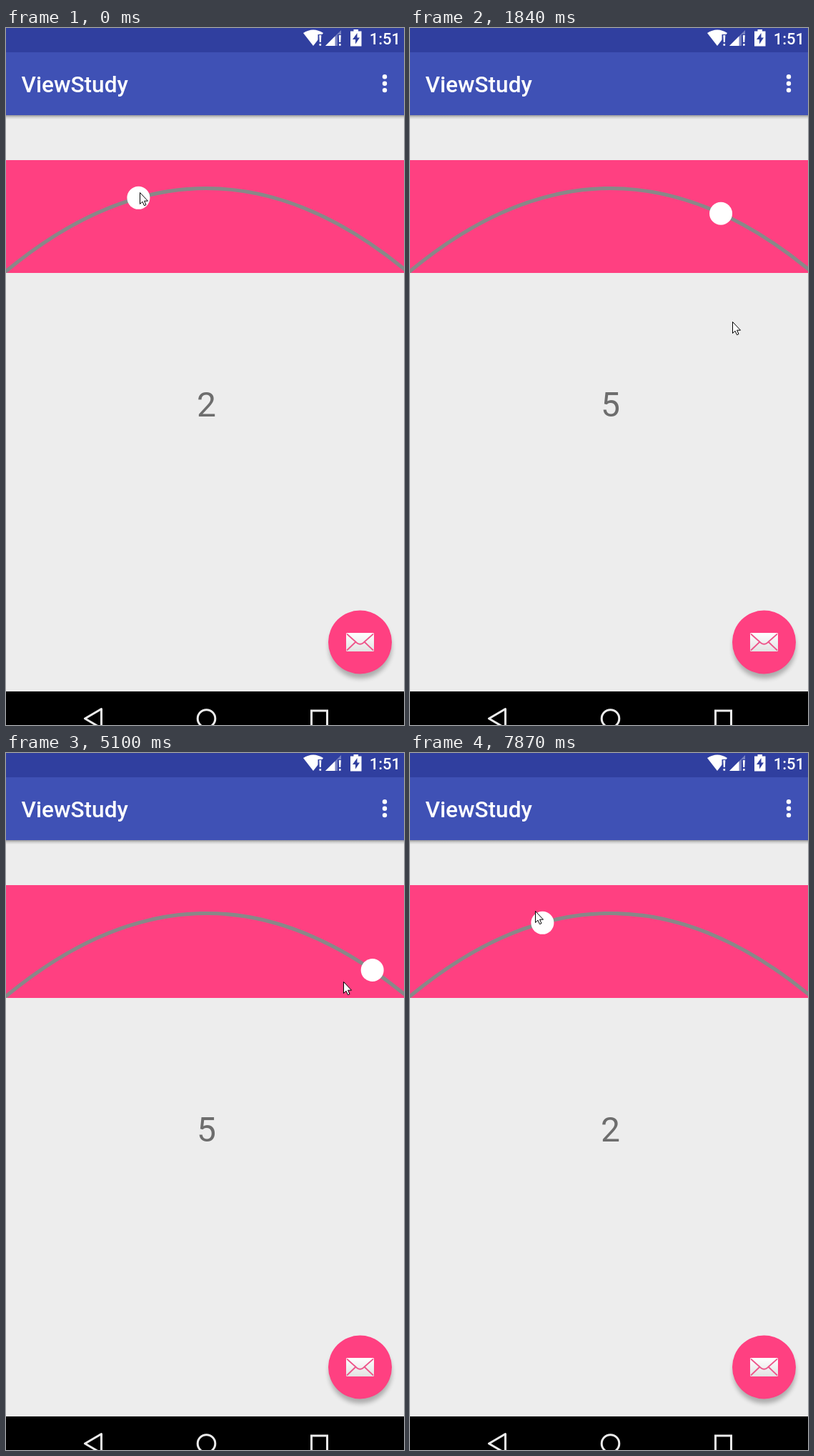
Animation of 557 by 976 pixels, one loop 8000 ms. Source, as an HTML page:

```html
<!DOCTYPE html>
<html lang="en">
<head>
<meta charset="utf-8">
<title>Arc slider</title>
<style>
html, body { margin: 0; width: 100%; height: 100%; overflow: hidden; background: #ededed; }
svg { display: block; width: 557px; height: 976px; font-family: Roboto, sans-serif; }
</style>
</head>
<body>
<svg viewBox="0 0 557 976">
  <defs>
    <linearGradient id="barShade" x2="0" y2="1">
      <stop stop-color="#000" stop-opacity=".36"/>
      <stop offset=".5" stop-color="#000" stop-opacity=".12"/>
      <stop offset="1" stop-color="#000" stop-opacity="0"/>
    </linearGradient>
    <linearGradient id="paper" x2="0" y2="1">
      <stop stop-color="#fff"/>
      <stop offset="1" stop-color="#e2e2e2"/>
    </linearGradient>
    <filter id="blur" x="-20%" y="-20%" width="140%" height="140%"><feGaussianBlur stdDeviation="3.2"/></filter>
    <clipPath id="panel"><rect y="185" width="557" height="158"/></clipPath>
  </defs>

  <rect width="557" height="976" fill="#ededed"/>
  <rect y="122" width="557" height="6" fill="url(#barShade)"/>
  <rect width="557" height="122" fill="#3f51b5"/>
  <rect width="557" height="34" fill="#303f9f"/>

  <!-- status icons -->
  <g fill="#fff">
    <path d="M416 7Q430-2 444 7L430 25Z"/>
    <path d="M447 25L469 3V25Z" opacity=".35"/>
    <path d="M447 25L460.500 11.500V25Z"/>
    <path d="M436.500 9H443V25H436.500ZM464 9H470V25H464Z" fill="#303f9f"/>
    <path d="M438.300 10H441.300L440.800 20H438.800ZM438.500 22H441.100V24.700H438.500ZM465.800 10H468.800L468.300 20H466.300ZM466 22H468.600V24.700H466Z"/>
    <path d="M486.500 2H493V4.500H497.500V25.500H482V4.500H486.500Z"/>
    <path d="M491.500 7L485 16H489V22.500L495 13.500H491.500Z" fill="#303f9f"/>
    <text x="552" y="22.500" font-size="22" font-weight="500" text-anchor="end">1:51</text>
    <text x="21.500" y="90" font-size="31.600" font-weight="500">ViewStudy</text>
    <circle cx="530" cy="68.300" r="3.200"/>
    <circle cx="530" cy="77.700" r="3.200"/>
    <circle cx="530" cy="87.100" r="3.200"/>
  </g>

  <g clip-path="url(#panel)">
    <rect y="185" width="557" height="158" fill="#ff4081"/>
    <path d="M-10 349Q280.500 100 571 349" fill="none" stroke="#888" stroke-width="5"/>
    <circle id="ball" r="16" fill="#fff"/>
  </g>
  <text id="digit" x="280.500" y="544" font-size="48" text-anchor="middle" fill="#6d6d6d"></text>

  <!-- mail button -->
  <circle cx="496" cy="867" r="44" opacity=".27" filter="url(#blur)"/>
  <circle cx="495.500" cy="860" r="44.500" fill="#ff4081"/>
  <rect x="476" y="847" width="39" height="26" rx="1.500" fill="url(#paper)"/>
  <path d="M477 848.500L491 861Q495.500 864.500 500 861L514 848.500M477 871.500L489 860M514 871.500L502 860" fill="none" stroke="#ee558b" stroke-width="1.800"/>

  <!-- navigation bar -->
  <rect y="929" width="557" height="47"/>
  <g fill="none" stroke="#ececec" stroke-width="3">
    <path d="M133.500 953.500L110.500 967L133.500 980.500Z" stroke-linejoin="round"/>
    <circle cx="280.500" cy="967" r="12.300"/>
    <rect x="427.500" y="956" width="22" height="22"/>
  </g>

  <path id="cursor" d="M.5 .5V16.500L4 13.200L6.500 18.700L9 17.600L6.600 12.200H11.500Z" fill="#fff" stroke="#000"/>
</svg>
<script>
const LOOP = 8000, LAG = 120, GRAB = 4.5, NOTCH = 185.4;
const $ = id => document.getElementById(id);

// Pointer strokes: begin and end in ms, then where each one leads
const strokes = [
  [20, 140, 178.5, 231], [140, 560, 292, 241], [800, 1920, 453, 413],
  [2460, 2690, 486.5, 545], [2690, 3040, 500, 679], [3330, 3820, 474.5, 284],
  [4050, 4390, 548, 346], [4810, 5460, 368, 285], [5750, 6150, 234.5, 255],
  [6500, 6690, 178.5, 322], [7350, 7610, 429, 625], [7610, 7870, 175, 221]
];

function ease(t, begin, end) {
  const u = Math.min(1, Math.max(0, (t - begin) / (end - begin)));
  return u * u * (3 - 2 * u);
}

function pointer(t) {
  let x = 187, y = 230;
  for (const [begin, end, toX, toY] of strokes) {
    const u = ease(t, begin, end);
    x += (toX - x) * u;
    y += (toY - y) * u;
  }
  return [x, y];
}

// The ball trails the pointer while held and rests on a notch when let go
function ballX(t) {
  const held = ease(t, 20, 160) - ease(t, 7080, 7220);
  return NOTCH + (pointer(t - LAG)[0] - GRAB - NOTCH) * held;
}

function draw(t) {
  const x = ballX(t);
  $('ball').setAttribute('cx', x);
  $('ball').setAttribute('cy', 224.5 + 0.001475 * (x - 280.5) ** 2);
  $('digit').textContent = Math.min(5, Math.round(x / 92.8));
  $('cursor').setAttribute('transform', `translate(${pointer(t).map(Math.round)})`);
}

const start = performance.now();
function tick() {
  draw((performance.now() - start) % LOOP);
  requestAnimationFrame(tick);
}
tick();
</script>
</body>
</html>
```
